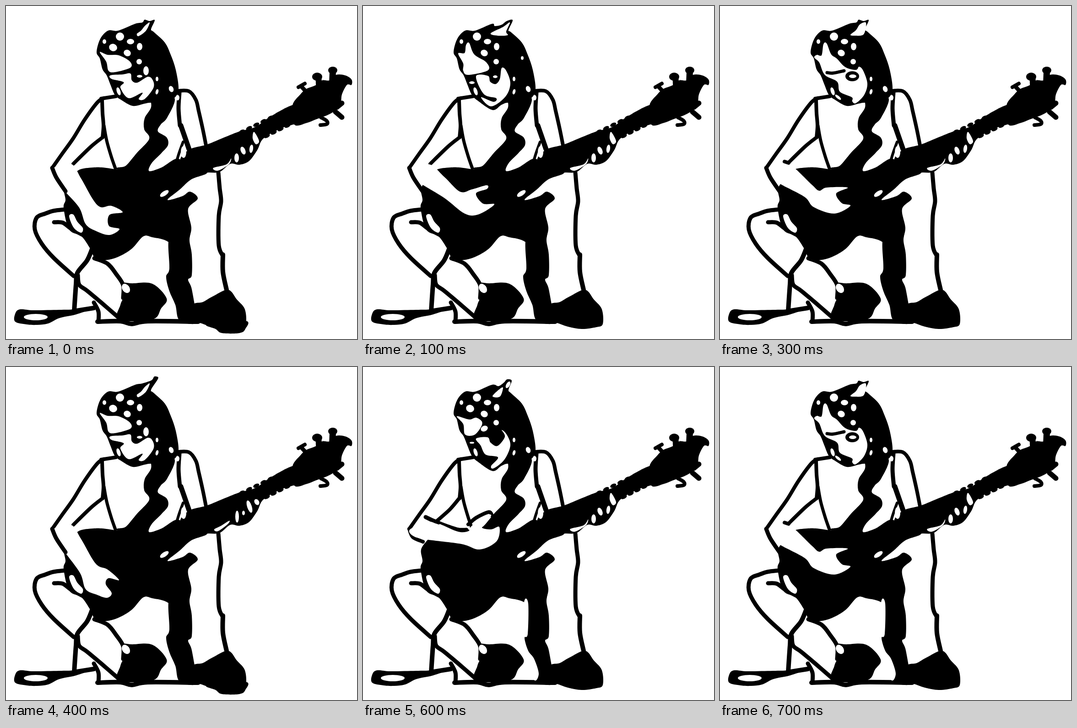
An HTML page with a canvas for the animation above (0.8 s loop, 767 by 730 pixels).

```html
<!DOCTYPE html>
<html lang="en">
<head>
<meta charset="utf-8">
<title>Guitar player</title>
<style>
html, body { margin: 0; width: 100%; height: 100%; overflow: hidden; background: #fff; }
canvas { display: block; }
</style>
</head>
<body>
<canvas id="stage" width="767" height="730"></canvas>
<script>
const ctx = document.getElementById('stage').getContext('2d');
const STEP = 100;
const INK = '#000', PAPER = '#fff';

const parse = s => s.trim().split(/\s+/).map(p => p.split(',').map(Number));

// Smooth curve through the given points
function trace(str, closed) {
  const p = parse(str), n = p.length;
  const at = i => closed ? p[(i + n) % n] : p[Math.max(0, Math.min(n - 1, i))];
  ctx.beginPath();
  ctx.moveTo(...p[0]);
  for (let i = 0; i < (closed ? n : n - 1); i++) {
    const a = at(i - 1), b = at(i), c = at(i + 1), d = at(i + 2);
    ctx.bezierCurveTo(b[0] + (c[0] - a[0]) / 6, b[1] + (c[1] - a[1]) / 6,
      c[0] - (d[0] - b[0]) / 6, c[1] - (d[1] - b[1]) / 6, ...c);
  }
}
function blob(str, color = INK) {
  trace(str, true);
  ctx.fillStyle = color;
  ctx.fill();
}
const hole = str => blob(str, PAPER);

function line(str, width = 8) {
  trace(str, false);
  ctx.lineWidth = width;
  ctx.lineCap = ctx.lineJoin = 'round';
  ctx.strokeStyle = INK;
  ctx.stroke();
}
// Each dot: x,y,rx,ry and an optional tilt in degrees
function dots(str, color = PAPER) {
  ctx.fillStyle = color;
  for (const [x, y, rx, ry, tilt = 0] of parse(str)) {
    ctx.beginPath();
    ctx.ellipse(x, y, rx, ry, tilt * Math.PI / 180, 0, 7);
    ctx.fill();
  }
}
// Row of bumps along a straight edge
function bumps(x, y, dx, dy, n) {
  for (let i = 0; i <= n; i++) dots(`${x + dx * i / n},${y + dy * i / n},7,4,-26`, INK);
}

function drawNeck() {
  blob(`380,340 400,315 438,304 470,291 510,275 545,265 580,241 628,217 640,235 632,257
    604,267 563,290 549,316 531,340 510,348 490,346 466,364 435,366 395,380`);
  bumps(453,306, 172, -84, 11);
  bumps(570,285, 60, -30, 4);
  blob(`626,218 643,194 656,182 676,174 691,163 707,163 721,151 741,152 755,161 755,173 745,173
    734,194 730,219 709,236 676,249 658,256 630,260`);
  line('639,178 653,170', 8);
  line('645,176 656,188', 9);
  dots('680,155,11,9 714,141,10,8', INK);
  line('683,158 684,180', 13);
  line('714,145 713,170', 14);
  line('688,244 701,252 701,259 687,261', 8);
  line('723,222 734,213', 11);
  line('720,232 734,244', 11);
}

function drawBody() {
  // strap
  blob(`243,359 262,350 286,322 313,291 302,270 303,246 317,222 318,195 350,185 369,205 352,245
    338,260 332,275 351,288 354,305 340,322 318,345 313,362 340,354 378,335 395,380 300,400`);
  // guitar
  blob(`127,400 142,378 160,359 190,354 212,354 250,359 320,363 400,340 440,364 405,380 380,402
    353,425 385,417 402,407 419,422 398,445 405,486 400,515 400,560 356,518 320,507 300,505
    275,532 245,550 218,557 195,553 184,532 165,505 138,490 126,443 130,425`);
  line('214,202 200,211 172,249 147,290 122,325 101,355');
  line('210,207 211,235 213,262 211,288');
  line('214,262 220,295 230,330 239,356', 7);
  line('208,203 240,198');
  line('375,186 400,187 415,206 421,230 430,270 437,305');
  line('379,190 377,225 380,262', 9);
  line('382,262 390,285 400,314', 11);
  line('387,298 379,320 374,336', 6);
  dots('388,320,6,13 346,411,11,5,-35');
}

function drawLegs() {
  blob(`356,510 380,490 402,490 401,515 406,545 406,590 398,600 405,617 412,653 420,694 380,690
    370,655 357,625 350,594 357,575`);
  line('464,365 467,400 470,428 465,460 465,525 474,548', 9);
  line('474,545 474,583 482,622', 10);
  blob('408,655 430,649 451,637 485,622 505,644 522,665 524,697 510,704 478,708 448,703 421,694 390,690');
  line('128,446 104,449 86,455 67,464 63,490 78,521 104,552 148,592', 9);
  line('105,474 124,475 142,488 170,503', 9);
  hole('138,461 147,457 156,473 168,487 164,497 148,486');
  line('188,533 177,558 156,585 153,610 149,668', 10);
  line('193,553 222,565 241,588 256,612 256,640', 9);
  line('157,590 160,611 177,624 208,650 246,683', 9);
  blob('246,688 250,655 259,632 252,608 276,608 320,609 351,641 339,663 320,687');
  dots('262,619,8,11,-35');
  line('148,669 192,662', 10);
  line('192,650 202,670 202,692', 9);
  line('200,692 250,691 275,697 310,691 420,692', 10);
  blob(`20,675 30,665 60,667 116,666 150,665 190,660 176,668 150,677 117,684 92,696 68,699 45,698 20,692`);
  dots('65,682,26,7');
}

function drawHead(knot, chin) {
  blob(`238,195 228,172 220,152 211,139 205,115 198,101 206,72 223,54 245,54 282,39 ${knot}
    323,57 347,80 360,107 371,140 377,183 366,203 340,214 316,212 ${chin}`);
}
const shortChin = '303,214 277,219 252,206';
const longChin = '302,217 283,228 250,207';
const plainKnot = '298,36 303,30 314,33 325,31 317,51';
const spots = '249,67,9,9 272,78,8,6 292,89,6,8 265,103,8,7,30 291,122,6,6 215,78,4,5 ' +
  '361,182,5,7,-20 375,201,4,6 330,160,3,5 330,188,3,6,15 246,187,4,9,-18';
const largeSpot = ' 234,91,9,8,25';

function calm(knot = plainKnot) {
  drawHead(knot, shortChin);
  hole('304,43 314,36 306,54 290,66 286,61 295,54');
  hole('205,101 222,107 246,108 270,121 272,135 238,145 224,142 219,122');
  hole(`228,152 255,150 272,148 275,163 287,168 310,155 321,163 322,180 303,204 290,204 298,190
    268,202 250,179 257,167 231,160`);
  dots(spots + largeSpot + ' 306,142,6,10 292,154,6,3');
}
const tall = () => calm('298,36 318,29 324,21 332,22 331,28 317,50');

function smile() {
  drawHead('288,44 303,41 314,33 327,31 318,53', longChin);
  hole('279,60 306,46 321,36 313,56 316,64 294,65');
  hole('208,104 222,103 225,86 232,81 243,106 269,123 273,141 230,151 219,142 219,126');
  hole(`247,154 273,153 278,166 290,171 299,160 303,136 313,142 322,170 311,199 280,220 258,200
    285,210 291,202 264,193`);
  dots(spots + ' 348,114,3,4 289,155,5,3 238,168,6,3');
}

function grin() {
  drawHead('296,42 308,34 315,27 325,30 318,50', longChin);
  hole('283,64 299,48 306,46 299,65');
  hole('205,108 232,115 247,111 260,120 257,133 243,149 223,148 219,125');
  hole(`247,157 272,154 279,166 294,173 310,153 303,138 314,148 322,172 309,203 286,222 280,217
    295,198 268,192 257,172`);
  dots(spots + largeSpot + ' 317,39,4,8,30 265,135,8,6,-25 238,166,5,2');
}

function browed(fringe) {
  drawHead(plainKnot, shortChin);
  hole('285,63 297,53 306,40 319,37 314,62 294,65');
  hole(`${fringe} 255,115 274,134 297,140 304,133 313,142 322,170 315,195 297,213 289,209
    288,200 262,188 256,166 229,151 217,124 206,113`);
  line('234,146 247,147 271,142', 7);
  dots('289,154,15,11', INK);
  dots(spots + ' 290,154,8,4 258,200,8,3,40');
}
const frown = () => { browed('207,105 224,111 242,107'); dots(largeSpot); };
const raised = () => browed('212,107 222,108 226,84 233,82 243,106');

// Forearms, from the inside of the elbow round to its outside
const low = `142,346 164,378 190,424 207,441 230,438 255,452 226,458 225,482 248,489 226,502
  196,493 174,478 160,442 128,405 106,372 104,355`;
const lowest = `142,346 164,377 196,431 222,444 247,467 224,463 218,476 231,496 220,506 198,499
  174,487 162,452 128,405 106,372 104,355`;
const middle = `144,347 178,375 212,407 238,402 270,393 271,401 247,411 262,433 287,435 252,457
  222,455 178,421 125,388 104,365`;
const lower = `144,347 176,375 210,412 240,410 269,418 245,426 254,445 268,457 250,471 202,456
  178,423 125,388 104,365`;
const upper = `144,342 164,356 202,393 217,405 233,398 279,398 254,411 266,432 285,438 250,455
  205,441 184,418 125,386 104,363`;
const high = `152,339 172,346 208,361 230,360 236,350 262,328 280,324 272,338 260,352 280,356
  298,351 292,382 255,400 215,388 138,378 109,370 104,355`;

function drawArm(arm) {
  if (arm === high) {
    line('211,287 190,312 162,337');
    line('137,329 165,342 205,356 226,357', 9);
    line('230,345 248,330 275,318 282,326');
    line('101,355 109,373 131,383');
    hole(arm);
    line('137,329 152,336 165,341', 8);
    return;
  }
  line('211,288 186,308 147,346');
  hole(arm);
  line('101,355 110,376 130,406', 9);
  if (arm === upper) line('141,341 150,344', 8);
}

function open() {
  hole('542,276 553,296 546,303 539,290');
  hole('453,355 482,347 492,334 487,347 463,361');
  dots('536,313,4,9,8 518,317,5,9,-22 504,333,5,10');
}
function shut() {
  hole('455,356 470,348 488,337 484,345 463,360');
  dots('548,296,5,7,-30 532,306,5,14,-18 519,320,3,5 505,328,4,13');
}
function back() {
  hole('486,297 497,313 507,338 493,327');
  hole('520,286 540,312 535,320 522,306');
  hole('453,355 482,347 492,337 463,361');
  dots('517,316,6,10,-25');
}

const poses = [
  { head: calm, arm: low, hand: open, heel: true },
  { head: smile, arm: middle, hand: open },
  { head: grin, arm: high, hand: open },
  { head: raised, arm: upper, hand: open },
  { head: tall, arm: lowest, hand: shut, heel: true },
  { head: frown, arm: lower, hand: back, shift: true },
  { head: grin, arm: high, hand: open, shift: true },
  { head: raised, arm: upper, hand: open, shift: true }
];

function draw({ head, arm, hand, heel, shift }) {
  ctx.fillStyle = PAPER;
  ctx.fillRect(0, 0, 767, 730);
  drawNeck();
  drawBody();
  drawLegs();
  if (heel) blob('440,698 458,708 472,717 510,717 523,708 523,690');
  if (shift) hole('352,516 361,518 360,585 353,594 361,622 374,640 384,673 372,683 350,600');
  drawArm(arm);
  head();
  hand();
}

let shown = -1;
function tick() {
  const i = Math.floor(performance.now() / STEP) % poses.length;
  if (i !== shown) draw(poses[shown = i]);
  requestAnimationFrame(tick);
}
tick();
</script>
</body>
</html>
```
